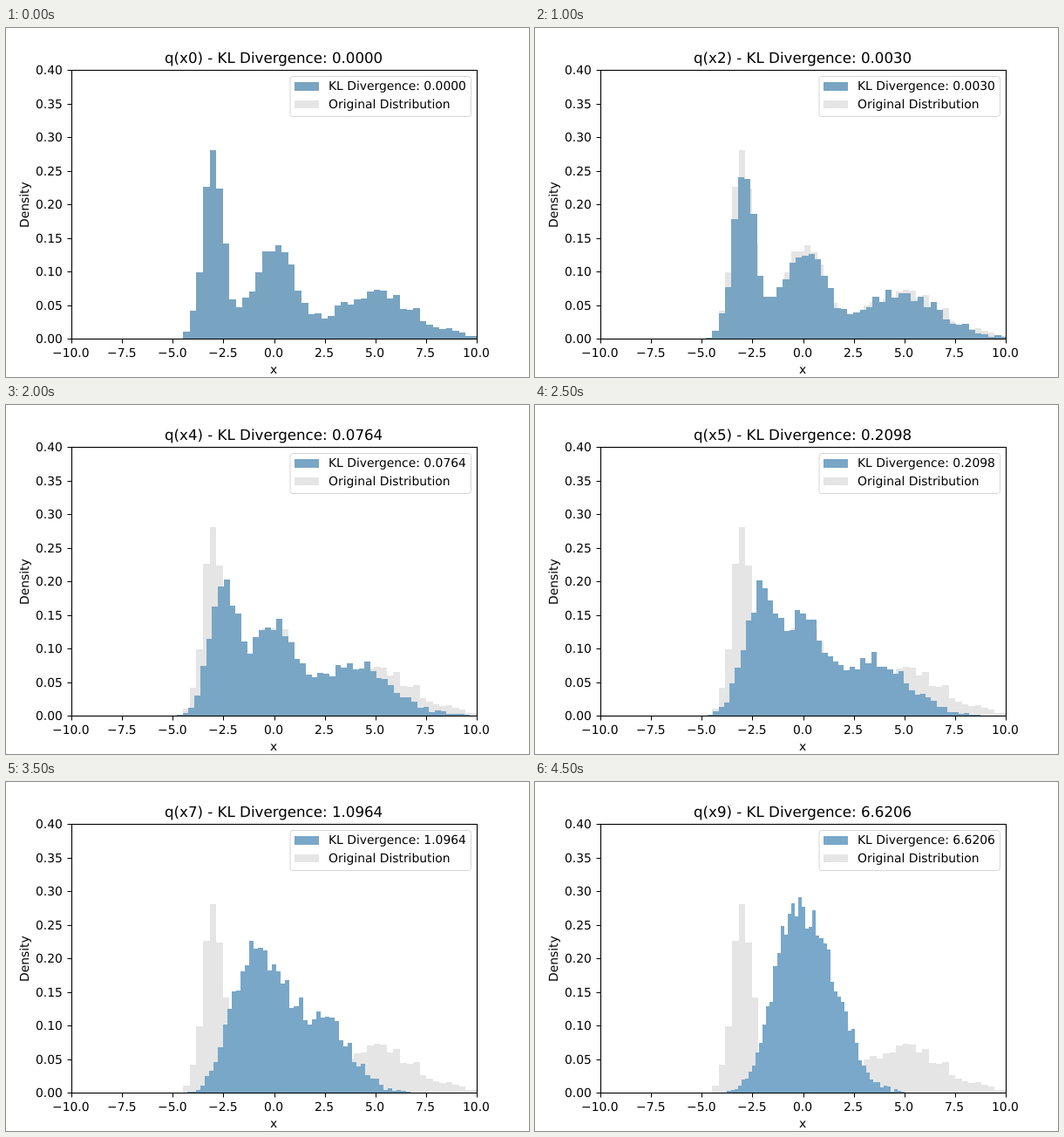
Animation, 600 px wide and 400 px high, one loop 5000 ms. Source, as an HTML page with a canvas:

```html
<!DOCTYPE html>
<html lang="en">
<head>
<meta charset="utf-8">
<title>Forward diffusion histogram</title>
<style>
  html, body { margin: 0; width: 100%; height: 100%; overflow: hidden; background: #fff; }
  canvas { display: block; width: 600px; height: 400px; }
</style>
</head>
<body>
<canvas id="stage" width="600" height="400"></canvas>
<script>
const ctx = document.getElementById('stage').getContext('2d');
const STEP_MS = 500;
const STEPS = 10;
const BINS = 50;
const SAMPLES = 6000;
const GRAY = '#e5e5e5';
const divergence = [0, 0.0006, 0.003, 0.0169, 0.0764, 0.2098, 0.451, 1.0964, 2.4187, 6.6206];

const plot = { left: 75, right: 540, top: 48, bottom: 356 };
const midX = (plot.left + plot.right) / 2;
const toX = v => midX + v * (plot.right - plot.left) / 20;
const toY = d => plot.bottom - d * (plot.bottom - plot.top) / 0.4;

// Three equally likely bell curves; each step shrinks them and adds unit noise.
const curves = [{ mean: -3, sd: 0.5 }, { mean: 0, sd: 1 }, { mean: 5, sd: 2 }];

function diffuse(step) {
  let kept = 1;
  for (let i = 0; i < step; i++) kept *= 1 - (0.01 + i * 0.49 / 9);
  return curves.map(({ mean, sd }) => ({
    mean: mean * Math.sqrt(kept),
    sd: Math.sqrt(kept * sd * sd + 1 - kept)
  }));
}

function density(parts, x) {
  const bell = ({ mean, sd }) =>
    Math.exp(-(((x - mean) / sd) ** 2) / 2) / (sd * Math.sqrt(2 * Math.PI));
  return parts.reduce((sum, p) => sum + bell(p), 0) / parts.length;
}

function seeded(seed) {
  return () => {
    seed = (seed * 16807) % 2147483647;
    return seed / 2147483647;
  };
}

function histogram(step) {
  const parts = diffuse(step);
  const random = seeded(7919 * (step + 1));
  const [low, , high] = parts;
  const start = low.mean - (3.6 - 0.07 * step) * low.sd;
  const width = (high.mean + 3.2 * high.sd - start) / BINS;
  return Array.from({ length: BINS }, (_, i) => {
    const a = start + i * width;
    const b = a + width;
    const mean = (density(parts, a) + 4 * density(parts, (a + b) / 2) + density(parts, b)) / 6;
    const spread = Math.sqrt(3 * mean / (SAMPLES * width));
    return { a, b, d: Math.max(0, mean + (random() * 2 - 1) * spread) };
  });
}

const histograms = Array.from({ length: STEPS }, (_, i) => histogram(i));

// Places text on whole pixels; anchor is 0 for left, 0.5 for centre, 1 for right.
function text(str, x, y, anchor = 0.5, size = 13.89) {
  ctx.font = `${size}px "DejaVu Sans", sans-serif`;
  ctx.textRendering = 'geometricPrecision';
  ctx.fillStyle = '#000';
  ctx.fillText(str, Math.floor(x - anchor * ctx.measureText(str).width), y);
}

function drawBars(bars, color) {
  ctx.save();
  ctx.beginPath();
  ctx.rect(plot.left, plot.top, plot.right - plot.left, plot.bottom - plot.top);
  ctx.clip();
  ctx.fillStyle = color;
  for (const { a, b, d } of bars) {
    const left = Math.round(toX(a));
    const top = Math.round(toY(d));
    ctx.fillRect(left, top, Math.round(toX(b)) - left, plot.bottom - top);
  }
  ctx.restore();
}

function drawAxes() {
  const { left, right, top, bottom } = plot;
  ctx.strokeStyle = '#000';
  ctx.lineWidth = 1.11;
  ctx.strokeRect(left + 0.5, top + 0.5, right - left, bottom - top);
  for (let i = 0; i <= 8; i++) {
    const value = i * 2.5 - 10;
    const x = toX(value);
    const y = Math.round(toY(i * 0.05));
    ctx.fillStyle = '#000';
    ctx.fillRect(Math.round(x), bottom + 1, 1, 4.5);
    ctx.fillRect(left - 4.5, y, 4.5, 1);
    text(value.toFixed(1).replace('-', '\u2212'), x, 377);
    text((i * 0.05).toFixed(2), 65.3, y + 5, 1);
  }
  text('x', midX, 396);
  ctx.save();
  ctx.translate(26, 202);
  ctx.rotate(-Math.PI / 2);
  text('Density', 0, 0);
  ctx.restore();
}

function drawLegend(label, color) {
  ctx.beginPath();
  ctx.roundRect(326, 55.5, 207.5, 46, 3);
  ctx.fillStyle = 'rgba(255,255,255,0.8)';
  ctx.fill();
  ctx.strokeStyle = '#d6d6d6';
  ctx.lineWidth = 1;
  ctx.stroke();
  ctx.fillStyle = color;
  ctx.fillRect(331, 62, 28, 10);
  ctx.fillStyle = GRAY;
  ctx.fillRect(331, 83, 28, 9);
  text(label, 370, 71, 0);
  text('Original Distribution', 370, 92, 0);
}

function draw(step) {
  const color = `rgb(121,${Math.round(164 + step * 0.4)},${193 + step})`;
  const label = `KL Divergence: ${divergence[step].toFixed(4)}`;
  ctx.fillStyle = '#fff';
  ctx.fillRect(0, 0, 600, 400);
  drawBars(histograms[0], GRAY);
  drawBars(histograms[step], color);
  drawAxes();
  drawLegend(label, color);
  text(`q(x${step}) - ${label}`, midX, 40, 0.5, 16.67);
}

const began = performance.now();
function tick() {
  const t = Math.max(0, performance.now() - began);
  draw(Math.floor(t / STEP_MS) % STEPS);
  requestAnimationFrame(tick);
}
tick();
</script>
</body>
</html>
```
